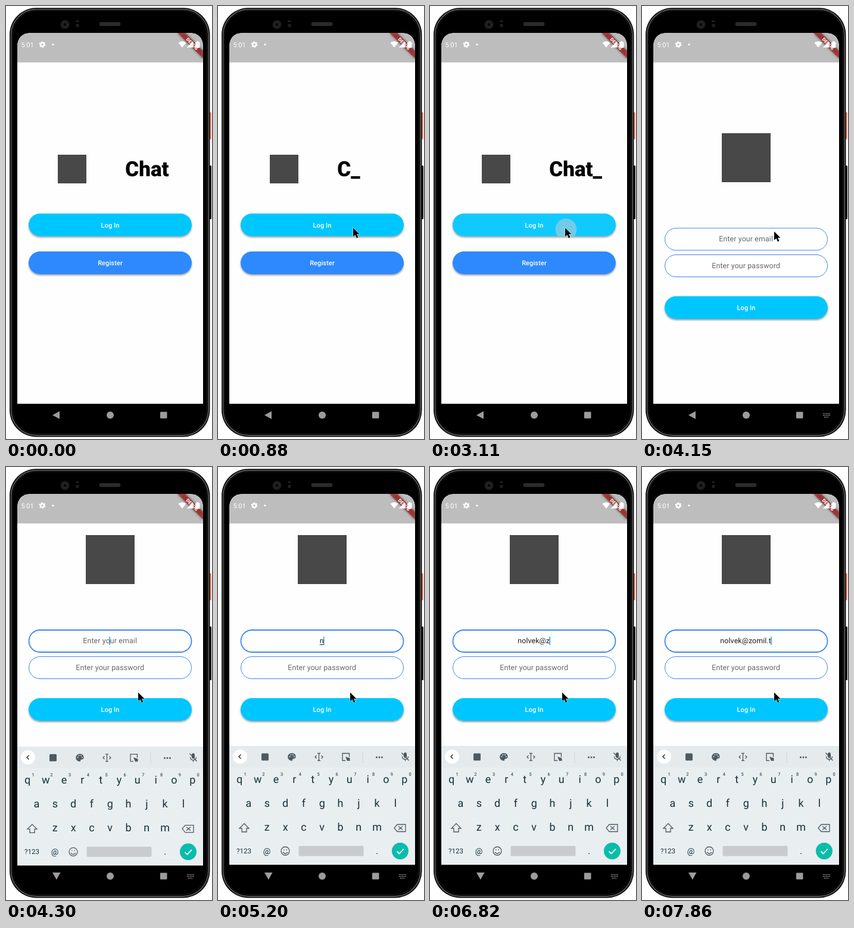
An HTML page that plays this animation: 346 by 725 pixels, repeating every 8000 ms.

```html
<!DOCTYPE html>
<html lang="en">
<head>
<meta charset="utf-8">
<title>Chat sign-in</title>
<style>
html, body { margin: 0; width: 100%; height: 100%; overflow: hidden; background: #fff; }
svg { display: block; width: 100%; height: 100%; }
text { font-family: Roboto, sans-serif; text-rendering: geometricPrecision; white-space: pre; }
.mid text, text.mid { text-anchor: middle; }
.label { font-size: 11px; font-weight: 500; letter-spacing: .1px; fill: #fff; }
.input { font-size: 12.4px; letter-spacing: .11px; }
.hint { fill: #666; }
.line { fill: none; stroke: #4d5a61; stroke-width: 1.3; }
</style>
</head>
<body>
<svg viewBox="0 0 346 725">
  <defs>
    <clipPath id="screen"><path d="M19 668V69Q19 45 43 45H307Q331 45 331 69V668Z"/></clipPath>
    <clipPath id="pill"><rect x="38" y="347.5" width="274" height="38" rx="19"/></clipPath>
    <filter id="drop" x="-5%" y="-20%" width="110%" height="150%">
      <feDropShadow dx="0" dy="2" stdDeviation="1.4" flood-opacity=".4"/>
    </filter>
    <filter id="soft" x="-20%" y="-20%" width="140%" height="140%"><feGaussianBlur stdDeviation="2"/></filter>
  </defs>

  <!-- phone body -->
  <rect x="340" y="178" width="4.5" height="45" rx="1" fill="#ee6a4e"/>
  <rect x="340" y="267" width="5" height="90" rx="1.5" fill="#111"/>
  <rect x="6" y="3" width="336.5" height="718.5" rx="45" fill="#0c0c0c"/>
  <rect x="8.5" y="5.5" width="331.5" height="713.5" rx="43" fill="#000" stroke="#555" stroke-width="1.8"/>
  <rect x="11" y="8" width="326" height="708" rx="40" fill="#000" stroke="#1c1c1c"/>
  <circle cx="99" cy="31" r="7.5" fill="#1d1d1f"/>
  <circle cx="99" cy="31" r="3.5" fill="#08080a" stroke="#39393d"/>
  <path d="M120 24v3M120 30v5" stroke="#1e1e1e" stroke-width="5"/>
  <rect x="157" y="27.5" width="35" height="5.5" rx="2.7" fill="#2b2b2b" stroke="#3a3a3a" stroke-width=".6"/>

  <!-- navigation bar -->
  <g fill="#9c9c9c">
    <path id="back"/>
    <circle cx="175" cy="685" r="6"/>
    <rect x="259" y="679.5" width="11.5" height="11" rx="1"/>
    <path id="imeIcon" d="M304 682.500h12M304 685.500h12M306 688.500h8" stroke="#9c9c9c" stroke-width="1.5" stroke-dasharray="1.5 1.1"/>
  </g>

  <g clip-path="url(#screen)">
    <rect x="19" y="45" width="312" height="621" fill="#fefefe"/>

    <g id="home">
      <rect x="87" y="249" width="48" height="48" fill="#484848"/>
      <text id="title" x="200.2" y="285" font-size="35" font-weight="900"></text>
      <g id="homeButtons"></g>
      <g id="press" clip-path="url(#pill)">
        <rect x="38" y="347" width="274" height="39" fill="#fff" opacity=".06"/>
        <circle cx="228.5" cy="374" r="18" fill="#d0cfd0" opacity=".5"/>
      </g>
    </g>

    <g id="login">
      <rect x="134" y="213" width="82" height="82" fill="#484848"/>
      <rect id="field" x="38.5" y="372" width="273" height="37" rx="18.5" fill="#fff" stroke="#3c86f5"/>
      <rect x="38.5" y="416.5" width="273" height="37" rx="18.5" fill="#fff" stroke="#3c86f5"/>
      <text id="hint" class="mid input hint" x="174.7" y="394">Enter your email</text>
      <text class="mid input hint" x="174.7" y="439">Enter your password</text>
      <text id="value" class="mid input" x="174.2" y="394" fill="#1d1d1d"></text>
      <path id="under" stroke="#1d1d1d"/>
      <rect id="caret" y="383" width="1.4" height="14" fill="#1698f5"/>
      <g id="loginButton"></g>
    </g>

    <g id="keyboard">
      <rect x="19" y="467" width="312" height="199" fill="#e9eef1"/>
      <rect x="19" y="467" width="312" height="36" fill="#e5eaed"/>
      <circle cx="37" cy="485" r="12" fill="#fff"/>
      <path id="chevron" class="line" style="stroke:#333;stroke-width:1.5"/>
      <g id="tools" fill="#4d5a61">
        <rect x="73" y="479.5" width="12" height="12" rx="1.5"/>
        <path d="M124 479a6.6 6.2 0 1 0 0 12.8c2 0 1-2 1.4-2.8s4.8 0 5.2-3.6S128 479 124 479Z"/>
        <g fill="#e5eaed"><circle cx="120.5" cy="485" r="1"/><circle cx="122.5" cy="482" r="1"/><circle cx="126" cy="482" r="1"/><circle cx="128" cy="485" r="1"/></g>
        <path class="line" d="M167 479.500h5M167 491.500h5M169.500 479.500v12M165.500 483l-2.500 2.500 2.500 2.500M173.500 483l2.500 2.500-2.500 2.500"/>
        <path class="line" d="M214 491.500h-5v-12h11.500v6"/>
        <path d="M214 485l7.500 2.500v4.500h-4.500Z"/>
        <path d="M243 477v19" stroke="#cfd5d8"/>
        <circle cx="266.5" cy="486" r="1.5"/><circle cx="271" cy="486" r="1.5"/><circle cx="275.5" cy="486" r="1.5"/>
      </g>
      <g id="tips" class="mid" fill="#4d5a61">
        <text id="tip" x="89" y="491" font-size="14.4"></text>
        <path d="M129.500 476v19M219.500 476v19" stroke="#c8cfd3"/>
        <g font-size="10.5" font-weight="500"><text x="174" y="480">nolvek</text><text x="259.5" y="480">nolvek</text></g>
        <g font-size="10"><text x="174" y="493">@zomil.test</text><text x="259.5" y="493">@uv.test</text></g>
      </g>
      <rect x="312" y="478" width="5" height="9" rx="2.5" fill="#4d5a61"/>
      <path class="line" d="M309.500 484.500q0 5 5 5t5-5M314.500 489.500v3M308.500 478.500l12 13"/>
      <g id="keys" class="mid" fill="#16303a"></g>
      <path class="line" d="M44 597l-8 8h4v6h8v-6h4Z"/>
      <path class="line" d="M301 598.500h14v12h-14l-5-6ZM303 601.500l7 6M310 601.500l-7 6"/>
      <circle class="line" cx="113" cy="643" r="7"/>
      <path class="line" d="M109 645q4 4.500 8 0M110 641h1.500M114.500 641h1.500"/>
      <rect x="135.5" y="634.5" width="109" height="17" rx="2" fill="#c8cccf"/>
      <circle cx="306" cy="643" r="14" fill="#08bdaa"/>
      <path d="M300.500 643.500l4 4 7.500-8" fill="none" stroke="#fff" stroke-width="1.8"/>
    </g>

    <!-- status bar -->
    <rect x="19" y="45" width="312" height="49.5" fill="#bdbdbd"/>
    <path d="M288 45H301L331 75V88Z" opacity=".5" filter="url(#soft)"/>
    <path d="M288 45H301L331 75V88Z" fill="#b71c1c" opacity=".63"/>
    <text class="mid" transform="translate(312.800 63.200) rotate(45)" y="2.8" font-size="7.8" font-weight="900" fill="#fff">DEBUG</text>
    <g fill="#fff">
      <text x="25.5" y="69" font-size="11">5:01</text>
      <circle cx="61" cy="64.5" r="3" fill="none" stroke="#fff" stroke-width="2.5"/>
      <circle cx="61" cy="64.5" r="4.7" fill="none" stroke="#fff" stroke-width="1.6" stroke-dasharray="2.46"/>
      <circle cx="79" cy="64.5" r="1.6"/>
      <path d="M289.500 61.500Q296 56.500 302.500 61.500L296 69.500Z"/>
      <path d="M303.500 69.500L314 59V69.500Z"/>
      <path d="M318 60.500h2v-1.500h3.500v1.500h2V70h-7.500Z"/>
    </g>
  </g>

  <path id="mouse" d="M0 0V14.500L3.500 11.400L5.900 17L8.500 15.900L6.100 10.400H10.500Z" stroke="#fff" paint-order="stroke"/>
</svg>

<script>
const $ = id => document.getElementById(id);
const show = (id, on) => $(id).style.display = on ? '' : 'none';
const setText = (id, s) => { if ($(id).textContent !== s) $(id).textContent = s; };

const button = (y, fill, label) =>
  `<rect x="38" y="${y}" width="274" height="38" rx="19" fill="${fill}" filter="url(#drop)"/>
   <text class="mid label" x="175" y="${y + 23}">${label}</text>`;
const cyan = '#00c6ff';
$('homeButtons').innerHTML = button(347.5, cyan, 'Log In') + button(411, '#2e89ff', 'Register');
$('loginButton').innerHTML = button(486, cyan, 'Log In');

const key = (s, x, y, size = 18) => `<text x="${x}" y="${y}" font-size="${size}">${s}</text>`;
const row = (letters, x, y) => [...letters].map((c, i) => key(c, x + i * 30.8, y)).join('');
$('keys').innerHTML = row('qwertyuiop', 36, 529) + row('asdfghjkl', 51.5, 569) +
  row('zxcvbnm', 82.3, 609) + key('?123', 43.5, 647, 11.5) + key('@', 82, 648, 14) + key('.', 267, 648, 16) +
  [...'1234567890'].map((d, i) => key(d, 45.5 + i * 30.8, 517, 7.5)).join('');

// Latest value whose start time has been reached
const at = (t, steps) => steps.reduce((v, [start, next]) => t >= start ? next : v, null);

const mousePath = [[440, [289, 412]], [590, [257, 391]], [740, [233, 376]], [880, [227, 371.5]], [3710, [222, 377.5]]];
const typed = [[0, ''], [5200, 'n'], [5350, 'no'], [5500, 'nol'], [5790, 'nolv'], [5940, 'nolve'], [6080, 'nolvek'],
  [6380, 'nolvek@'], [6820, 'nolvek@z'], [7110, 'nolvek@zo'], [7260, 'nolvek@zomi'], [7410, 'nolvek@zomil'],
  [7860, 'nolvek@zomil.t']];

// Typewriter: one letter per beat, then a blinking underscore
function title(t) {
  if (t < 740) return 'Chat';
  if (t < 880) return '';
  const n = 1 + Math.floor((t - 870) / 297.5);
  return 'Chat'.slice(0, n) + (n <= 4 || n % 2 === 0 ? '_' : '');
}

function draw(t) {
  const atHome = t < 3260, open = t >= 4300;
  show('home', atHome);
  show('login', !atHome);
  show('press', t >= 3110);
  setText('title', title(t));

  const mouse = at(t, mousePath);
  show('mouse', mouse);
  if (mouse) $('mouse').setAttribute('transform', `translate(${mouse})`);

  show('imeIcon', t >= 4150);
  $('back').setAttribute('d', open ? 'M78 679H91.500L84.800 691Z' : 'M78 685L90 678.500V691.500Z');
  $('login').setAttribute('transform', `translate(0 ${open ? -99 : 0})`);
  $('field').setAttribute('stroke-width', open ? 1.8 : 1);

  const value = at(t, typed), composing = value && t < 6380;
  show('hint', !value);
  setText('value', value);
  const half = value ? $('value').getComputedTextLength() / 2 : 0;
  show('caret', open && (t < 4600 || value));
  $('caret').setAttribute('x', 173.6 + half);
  show('under', composing);
  $('under').setAttribute('d', `M${174.2 - half} 396.500H${174.2 + half}`);

  const tips = t >= 5350 && t < 6520;
  show('keyboard', open);
  $('keyboard').setAttribute('transform', `translate(0 ${t < 4450 ? 1.3 : 0})`);
  show('tools', !tips);
  show('tips', tips);
  setText('tip', value.slice(0, 6));
  $('chevron').setAttribute('d', tips ? 'M35.500 481.500l3.500 3.500-3.500 3.500' : 'M38.500 481.500l-3.500 3.500 3.500 3.500');
}

const start = performance.now();
function loop() {
  draw((performance.now() - start) % 8000);
  requestAnimationFrame(loop);
}
loop();
</script>
</body>
</html>
```
